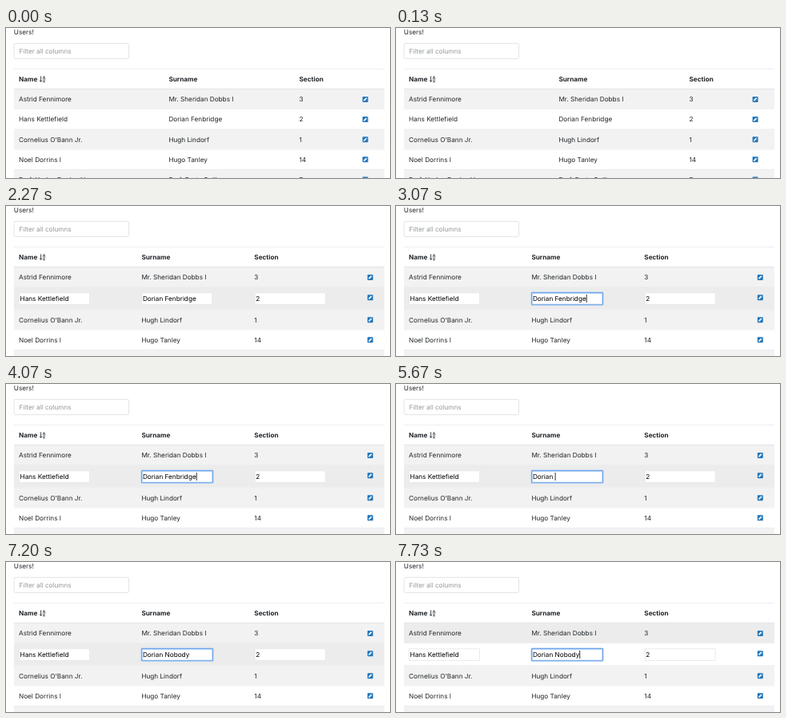
Animation, 480 px wide and 188 px high, one loop 8000 ms. Source, as an HTML page:

```html
<!DOCTYPE html>
<html lang="en">
<head>
<meta charset="utf-8">
<title>Editable table</title>
<style>
  html, body { margin: 0; width: 100%; height: 100%; overflow: hidden; background: #fff; }
  svg { display: block; width: 100%; height: 100%; }
  text { font: 8.2px Inter, "Liberation Sans", sans-serif; fill: #212529; text-rendering: geometricPrecision; white-space: pre; }
  .head { font-weight: 700; }
  .hint { fill: #92979c; }
  .field { fill: #000; }
</style>
</head>
<body>
<svg id="stage" viewBox="0 0 480 188" xmlns="http://www.w3.org/2000/svg"></svg>
<script>
const LOOP = 8000;
const HOVER = 1800, EDIT = 2270, FOCUS = 3070, ERASE = 4200, LEAVE = 7670;
const LEFT = 9.9, WIDTH = 463, TOP = 76.4, PITCH = 25.15, GROWN = 28.1;
const FIRST = "Dorian ", OLD = "Fenbridge", NEW = "Nobody";
const KEYS = [5870, 6130, 6270, 6470, 6600, 6730];
const CARET = [[FOCUS, 3530], [4070, 4730], [5200, 5730], [5870, 7200], [LEAVE, LOOP]];
const PEOPLE = [
  ["Astrid Fennimore", "Mr. Sheridan Dobbs I", "3"],
  ["Hans Kettlefield", FIRST + OLD, "2"],
  ["Cornelius O'Bann Jr.", "Hugh Lindorf", "1"],
  ["Noel Dorrins I", "Hugo Tanley", "14"],
  ["Prof. Harlan Dooley V", "Prof. Berta Quill", "7"]
];

const stage = document.getElementById("stage");

function add(tag, attrs, parent = stage) {
  const el = document.createElementNS("http://www.w3.org/2000/svg", tag);
  set(el, attrs);
  parent.appendChild(el);
  return el;
}

function set(el, attrs) {
  for (const key in attrs) el.setAttribute(key, attrs[key]);
}

function label(str, x, y, cls = "", parent = stage) {
  const el = add("text", { x, y, class: cls }, parent);
  el.textContent = str;
  return el;
}

const show = (el, on) => set(el, { visibility: on ? "visible" : "hidden" });

// Filter box
label("Users!", 9.8, 7.8);
add("rect", { x: 10.1, y: 19.3, width: 143.5, height: 19.2, rx: 2, fill: "#fff", stroke: "#d6d9dc", "stroke-width": 0.7 });
label("Filter all columns", 16.4, 32, "hint");

// Table rows
const rows = PEOPLE.map(person => {
  const g = add("g", {});
  const bg = add("rect", { x: LEFT, y: 0, width: WIDTH, height: PITCH }, g);
  add("rect", { x: LEFT, y: 0, width: WIDTH, height: 0.5, fill: "#e2e5e8" }, g);
  const cells = person.map(str => label(str, 16, 15.9, "", g));
  const pen = add("g", {}, g);
  add("rect", { x: -3.5, y: -3.5, width: 7, height: 7, rx: 0.9, fill: "#2577bb" }, pen);
  add("path", { d: "M-2.2 2.2L-1.9 .7L.6-1.8L1.8-.6L-.7 1.9ZM.9-2.1L1.3-2.4L2.4-1.3L2.1-.9Z", fill: "#fff" }, pen);
  return { g, bg, cells, pen };
});

// Header
add("rect", { x: LEFT, y: 50.9, width: WIDTH, height: 0.6, fill: "#dee2e6" });
add("rect", { x: LEFT, y: 75.8, width: WIDTH, height: 0.9, fill: "#e0e4e7" });
const heads = ["Name", "Surname", "Section"].map(str => label(str, 16, 67, "head"));
const line = { fill: "none", stroke: "#212529", "stroke-width": 0.85 };
add("path", { d: "M43.6 60.4V67M42 65.6L43.6 67.4L45.2 65.6", ...line });
add("path", { d: "M46 63.7L47.5 60.4L49 63.7M46.5 62.8H48.5M46.1 65H48.8L46.2 67.6H49", ...line, "stroke-width": 0.7 });

// Editors of the second row
const form = add("g", {});
function field(x, str) {
  const box = add("rect", { x, y: 108.8, width: 88, height: 14.6, fill: "#fff", stroke: "#e8e8e8", "stroke-width": 0.9 }, form);
  return { box, text: label(str, x + 1.1, 118.8, "field", form) };
}
field(16.5, PEOPLE[1][0]);
const surname = field(169.8, "");
field(311.2, PEOPLE[1][2]);
const focus = { x: 169.6, y: 108.6, width: 88.9, height: 15.2, fill: "none" };
const glow = add("rect", { ...focus, rx: 1, stroke: "#b5d2f5", "stroke-width": 2.6, "stroke-opacity": 0.75 }, form);
const ring = add("rect", { ...focus, rx: 0.5, stroke: "#70a7e9", "stroke-width": 1.1 }, form);
const caret = add("rect", { y: 111, width: 0.8, height: 10, fill: "#000" }, form);

function draw(t) {
  const editing = t >= EDIT;
  const hovered = t < HOVER ? -1 : t < LEAVE ? 1 : 0;
  const columns = editing ? [16, 169.4, 310.3] : [16, 203.4, 366.4];

  heads.forEach((el, i) => set(el, { x: columns[i] }));
  let y = TOP;
  rows.forEach((row, i) => {
    const grown = editing && i === 1;
    const height = grown ? GROWN : PITCH;
    set(row.g, { transform: `translate(0 ${y})` });
    set(row.bg, { height, fill: i === hovered ? "#ececec" : i % 2 ? "#fff" : "#f2f2f2" });
    row.cells.forEach((el, c) => {
      set(el, { x: columns[c] });
      show(el, !grown);
    });
    set(row.pen, { transform: `translate(${editing ? 455.3 : 449.1} ${grown ? 13.1 : 13})` });
    y += height;
  });

  show(form, editing);
  const typed = KEYS.filter(k => t >= k).length;
  surname.text.textContent = FIRST + (t < ERASE ? OLD : NEW.slice(0, typed));
  const focused = t >= FOCUS;
  show(glow, focused);
  show(ring, focused);
  show(caret, CARET.some(([on, off]) => t >= on && t < off));
  set(caret, { x: 171 + surname.text.getComputedTextLength() });
}

const start = performance.now();
function tick() {
  draw((performance.now() - start) % LOOP);
  requestAnimationFrame(tick);
}
tick();
</script>
</body>
</html>
```
